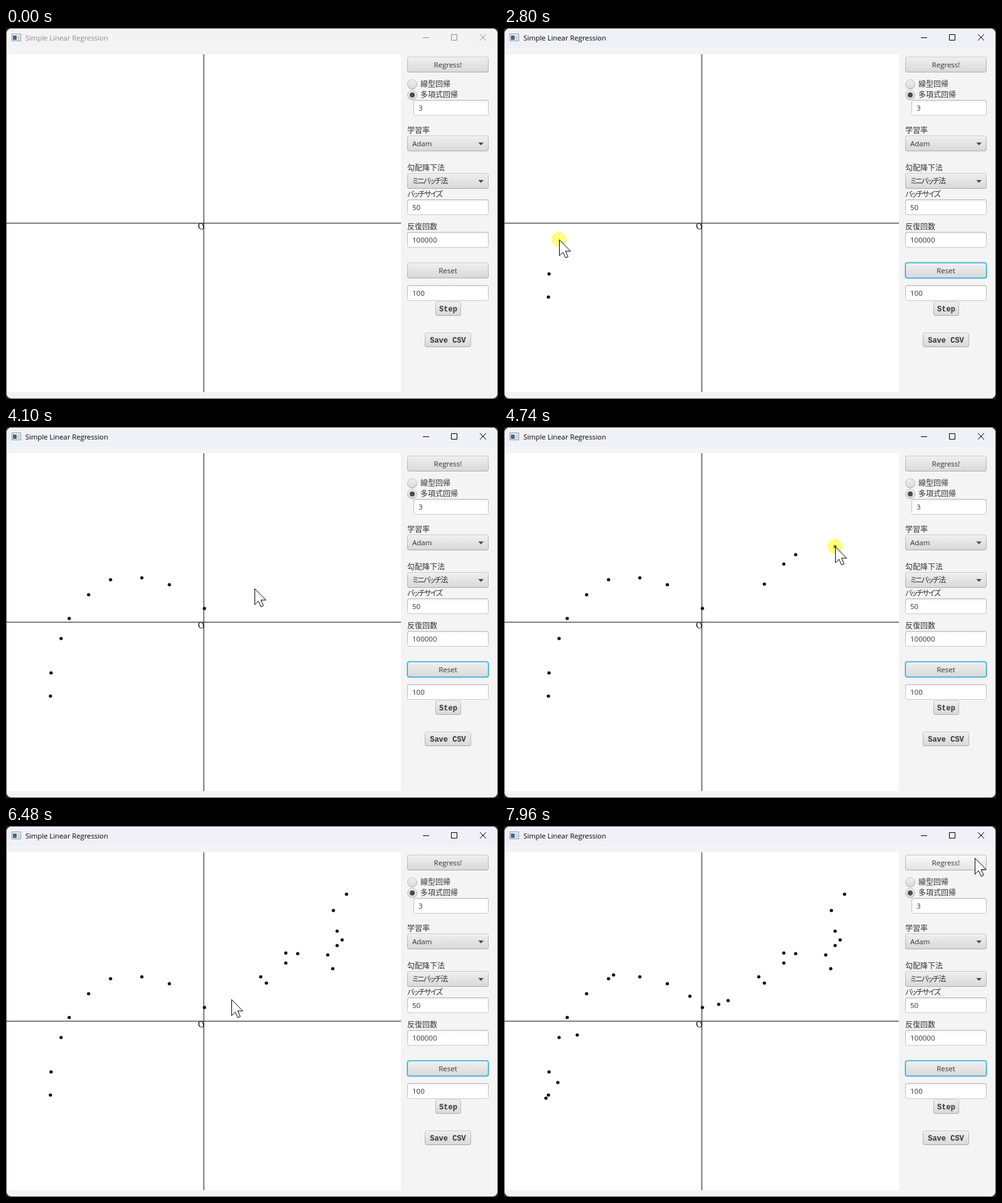
An HTML page that plays this animation: 786 by 593 pixels, repeating every 8000 ms.

```html
<!DOCTYPE html>
<html lang="ja">
<head>
<meta charset="utf-8">
<title>Simple Linear Regression</title>
<style>
html, body { margin: 0; width: 100%; height: 100%; overflow: hidden; background: #202020; }
svg { display: block; width: 786px; height: 593px; }
text { font: 11.5px "Open Sans", "Noto Sans CJK JP", "Noto Sans CJK", sans-serif; fill: #333; }
.ja { font: 12px "Noto Sans CJK JP", "Noto Sans CJK", sans-serif; }
.kana { font-feature-settings: "palt"; letter-spacing: -1.5px; }
.mono { font: bold 12px "Liberation Mono", monospace; }
.mid { text-anchor: middle; }
#caption { font-size: 11.3px; fill: #8c8c8c; }
#controls { fill: none; stroke: #8c8c8c; }
#bar { fill: #f3f3f3; }
.active #bar { fill: #f0f0f9; }
.active #caption { fill: #000; }
.active #controls { stroke: #000; }
#focus { visibility: hidden; }
.focused #focus { visibility: visible; }
.hover #regress .face { fill: url(#faceHover); }
</style>
</head>
<body>
<svg id="stage" viewBox="0 0 786 593">
  <defs>
    <linearGradient id="face" x2="0" y2="1">
      <stop offset="0" stop-color="#efefef"/><stop offset="1" stop-color="#d9d9d9"/>
    </linearGradient>
    <linearGradient id="faceHover" x2="0" y2="1">
      <stop offset="0" stop-color="#f9f9f9"/><stop offset="1" stop-color="#e4e4e4"/>
    </linearGradient>
    <linearGradient id="edge" x2="0" y2="1">
      <stop offset="0" stop-color="#c4c4c4"/><stop offset="1" stop-color="#aaa"/>
    </linearGradient>
    <linearGradient id="fieldEdge" x2="0" y2="1">
      <stop offset="0" stop-color="#b5b5b5"/><stop offset="1" stop-color="#cacaca"/>
    </linearGradient>
    <linearGradient id="field" x2="0" y2="1">
      <stop offset="0" stop-color="#f1f1f1"/><stop offset=".2" stop-color="#fff"/>
    </linearGradient>
  </defs>

  <rect width="786" height="593" fill="#202020"/>
  <rect x=".5" y=".5" width="785" height="592" rx="8" fill="#f4f4f4" stroke="#484848"/>
  <path id="bar" d="M1 31V9a8 8 0 0 1 8-8H777a8 8 0 0 1 8 8V31z"/>
  <rect x="9.5" y="9.5" width="14" height="11" fill="#f6f6f6" stroke="#8e9399"/>
  <rect x="11" y="12" width="6" height="7" fill="#3c6797"/>
  <rect x="18" y="12" width="4" height="7" fill="#cdd2d8"/>
  <text id="caption" x="31" y="20">Simple Linear Regression</text>
  <path id="controls" d="M666 15.5h10M711.5 10.5h9v9h-9zM757 10l10 10M767 10l-10 10"/>

  <rect x="1" y="42" width="630" height="540" fill="#fff"/>
  <path d="M316 42V582M1 312H631" stroke="#000"/>
  <text transform="translate(306.5 312) scale(1 -1)"
    style="font: italic 14px 'Liberation Serif', serif; fill: #000">O</text>

  <g id="panel"></g>
  <g id="focus" fill="none">
    <rect x="640.5" y="374.5" width="131" height="26" rx="4" stroke="#039ed3" stroke-opacity=".25" stroke-width="2"/>
    <rect x="641.5" y="375.5" width="129" height="24" rx="3" stroke="#039ed3"/>
  </g>
  <g id="dots"></g>
  <g id="pointer">
    <circle id="press" r="12" fill="#ff0" fill-opacity=".5"/>
    <path d="M.5.5V26L6.2 20.4L10.4 29.4L14.3 27.6L10.2 18.7H18.3z" fill="#fff" stroke="#000"/>
  </g>
</svg>
<script>
const LOOP = 8000, HOLD = 90, DOT_DELAY = 70;
const find = id => document.getElementById(id);
const stage = find("stage"), pointer = find("pointer"), press = find("press");

// ---- side panel ----
const text = (x, y, s, cls = "") => `<text x="${x}" y="${y}" class="${cls}">${s}</text>`;
const box = (x, y, w, h, fill, edge) =>
  `<rect x="${x + .5}" y="${y + .5}" width="${w - 1}" height="${h - 1}" rx="2.5" class="face" fill="url(#${fill})" stroke="url(#${edge})"/>`;
const button = (x, y, w, h, s, cls = "", id = "") =>
  `<g id="${id}">${box(x, y, w, h, "face", "edge")}
   <path d="M${x + 3} ${y + 1.5}h${w - 6}" stroke="#fafafa"/>
   ${text(x + w / 2, y + h / 2 + 4, s, "mid " + cls)}</g>`;
const field = (x, y, s) => box(x, y, 771 - x, 25, "field", "fieldEdge") + text(x + 8, y + 17, s);
const combo = (y, s, cls) => button(641, y, 130, 25, "") + text(649, y + 17, s, cls) +
  `<path d="M754.5 ${y + 11}h8.5l-4.25 4.5z" fill="#4a4a4a"/>`;
const radio = (y, s, on) =>
  `<circle cx="649" cy="${y}" r="7.5" fill="url(#face)" stroke="url(#edge)"/>` +
  (on ? `<circle cx="649" cy="${y}" r="4" fill="#4b4858"/>` : "") + text(662, y + 4, s, "ja");

find("panel").innerHTML = [
  button(641, 46, 130, 25, "Regress!", "", "regress"),
  radio(90, "線型回帰"),
  radio(107, "多項式回帰", true),
  field(651, 115, "3"),
  text(641, 168, "学習率", "ja"),
  combo(172, "Adam"),
  text(641, 228, "勾配降下法", "ja"),
  combo(232, "ミニバッチ法", "ja kana"),
  text(641, 270, "バッチサイズ", "ja kana"),
  field(641, 274, "50"),
  text(641, 322, "反復回数", "ja"),
  field(641, 326, "100000"),
  button(641, 375, 130, 25, "Reset"),
  field(641, 411, "100"),
  button(686, 437, 41, 23, "Step", "mono"),
  button(669, 487, 74, 23, "Save CSV", "mono")
].join("");

// ---- pointer route: clicks hold still, passes are only moved through ----
const click = (t, x, y) => ({ t, x, y, click: true });
const pass = (t, x, y) => ({ t, x, y });
const route = [
  pass(930, 349, 200), pass(1690, 71, 430),
  click(2010, 71, 430), click(2430, 72, 393), click(2770, 88, 338),
  click(2940, 101, 306), click(3120, 132, 268), click(3310, 167, 244),
  click(3510, 217, 241), click(3710, 261, 252), click(3910, 317, 290),
  click(4140, 416, 251), click(4270, 447, 219), click(4385, 466, 204),
  click(4665, 529, 191), pass(4940, 565, 150), click(5130, 544, 109),
  pass(5290, 532, 105), click(5360, 523, 135), click(5500, 514, 206),
  click(5590, 522, 228), click(5690, 537, 182), pass(5800, 529.5, 180),
  click(5860, 529, 168), pass(6125, 464, 187), click(6180, 447, 203),
  click(6330, 407, 241), click(6490, 358, 279), click(6600, 343, 285),
  click(6760, 297, 272), pass(6940, 248, 250), click(7060, 175, 238),
  pass(7220, 151, 266), click(7320, 117, 334), click(7490, 86, 410),
  click(7640, 67, 435), pass(7770, 67, 442), pass(7945, 752, 51)
];
const keys = route.flatMap(p => p.click ? [p, pass(p.t + HOLD - 1, p.x, p.y)] : [p]);
const clicks = route.filter(p => p.click);

find("dots").innerHTML = clicks.map(p => `<circle cx="${p.x}" cy="${p.y}" r="2.6"/>`).join("");
const dots = [...find("dots").children];

// Monotone cubic interpolation: smooth, without overshoot
const slope = (i, axis) =>
  keys[i] && keys[i + 1] ? (keys[i + 1][axis] - keys[i][axis]) / (keys[i + 1].t - keys[i].t) : 0;
function tangent(i, axis) {
  const a = slope(i - 1, axis), b = slope(i, axis);
  return a * b <= 0 ? 0 : 2 * a * b / (a + b);
}
function position(t, axis) {
  const i = keys.findLastIndex(k => k.t <= t);
  if (i < 0) return keys[0][axis];
  if (i === keys.length - 1) return keys[i][axis];
  const span = keys[i + 1].t - keys[i].t, u = (t - keys[i].t) / span, v = 1 - u;
  return v * v * (1 + 2 * u) * keys[i][axis] + u * u * (3 - 2 * u) * keys[i + 1][axis]
    + span * u * v * (v * tangent(i, axis) - u * tangent(i + 1, axis));
}

const show = (el, on) => el.setAttribute("visibility", on ? "visible" : "hidden");

function draw(t) {
  const x = Math.round(position(t, "x")), y = Math.round(position(t, "y"));
  pointer.setAttribute("transform", `translate(${x} ${y})`);
  show(pointer, t >= 930);
  show(press, t >= 930 && clicks.some(p => t >= p.t && t < p.t + HOLD));
  dots.forEach((dot, i) => show(dot, t >= clicks[i].t + DOT_DELAY));
  stage.classList.toggle("active", t >= 2010);
  stage.classList.toggle("focused", t >= 2050);
  stage.classList.toggle("hover", t > 7800 && x > 640 && y > 45 && y < 71);
}

const start = performance.now();
function tick() {
  draw((performance.now() - start) % LOOP);
  requestAnimationFrame(tick);
}
tick();
</script>
</body>
</html>
```
